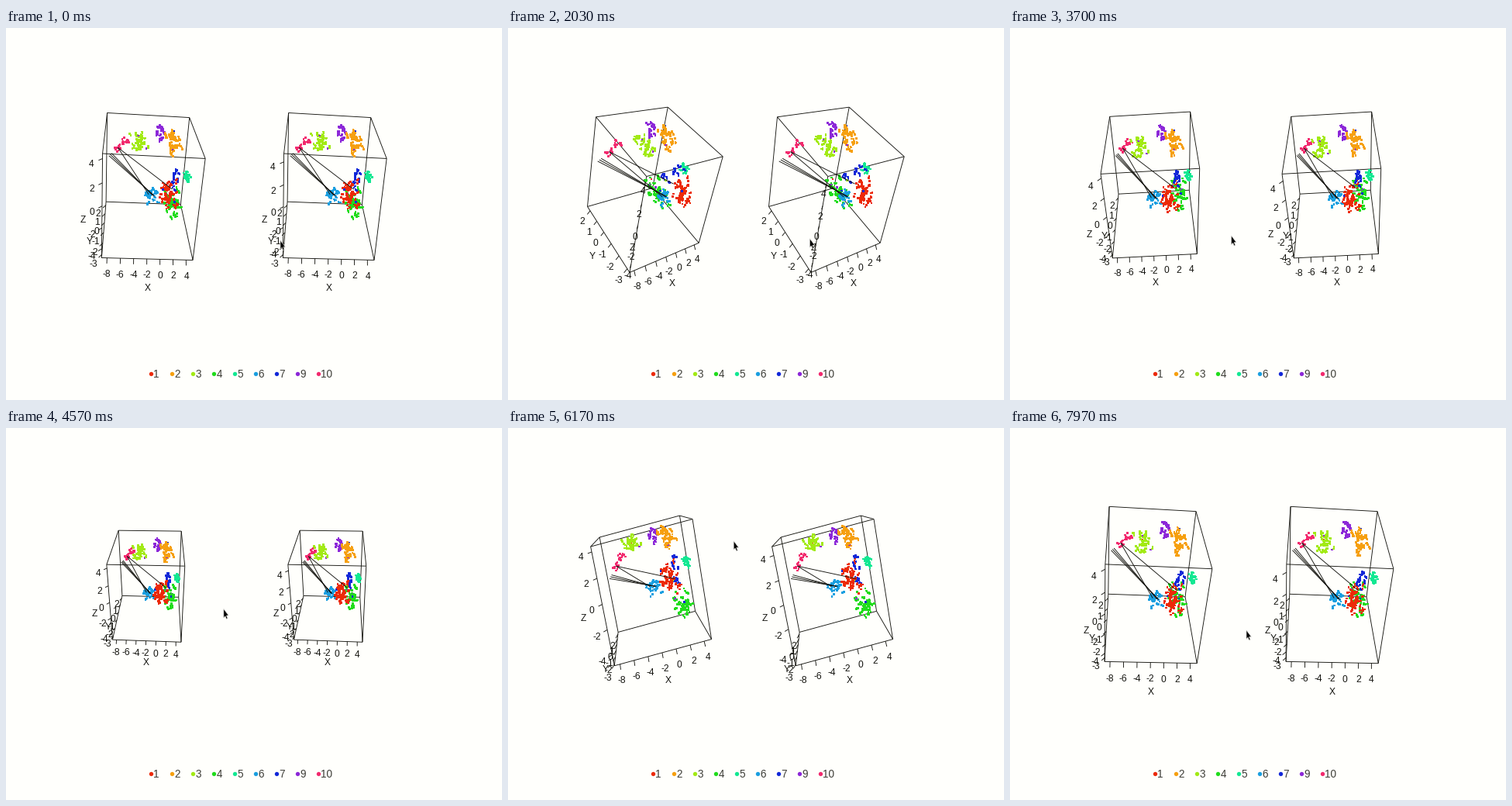
A matplotlib script for the animation above (8010 ms loop, 640x480 px).

```python
import itertools

import numpy as np
import matplotlib.pyplot as plt
from matplotlib.animation import FuncAnimation
from matplotlib.collections import LineCollection
from matplotlib.colors import to_rgba
from matplotlib.patches import Polygon

W, H, DPI = 640, 480, 100
STEP, FRAMES = 30, 267
PX = 72 / DPI

CENTERS = np.array([[183.5, 200.5], [417.5, 200.5]])
EDGE, SQUEEZE, EYE = 139.5, 0.815, 4.2
INK = "#14140f"
FONT = "Liberation Sans"

COLORS = {1: "#ec2a08", 2: "#f6a010", 3: "#a2ea14", 4: "#20dc1c", 5: "#12e892",
          6: "#1a9fe0", 7: "#1228d8", 9: "#8c28d8", 10: "#f22a6e"}

# time: pitch, spin, roll
POSES = {
    850: (27, 5.1, 4.3),
    1530: (24, 6.9, 7.3),
    2530: (42, 3.1, -8),
    4570: (29.5, -3.8, -.8),
    6170: (10.2, .6, -12.4),
    6730: (29.8, 71.5, 33),
    7970: (34.3, 6.2, 5.3),
}
# sideways drags out and back: start, end, degrees
SWINGS = [(850, 1530, 30), (1530, 2530, 36), (6730, 7400, 9)]

# group: centre, half axis, spread
CLUSTERS = {
    1: ((.195, -.34, .075), (0, .02, .07), .047),
    2: ((.265, .17, .38), (0, .08, .04), .045),
    3: ((-.14, .06, .395), (0, .13, 0), .040),
    4: ((.355, .20, -.33), (.01, .15, .02), .047),
    5: ((.42, -.07, .14), (.01, 0, .03), .019),
    6: ((.03, -.25, .01), (.05, 0, -.01), .025),
    7: ((.30, -.02, .07), (0, .14, -.16), .015),
    9: ((.135, .31, .40), (0, .02, .02), .020),
    10: ((-.36, .375, .19), (.11, -.045, .11), .010),
}


def monotone_tangents(t, v):
    slope = np.diff(v, axis=0) / np.diff(t)[:, None]
    a, b = slope[:-1], slope[1:]
    same = a * b > 0
    m = np.zeros_like(v)
    m[1:-1] = np.where(same, 2 * a * b / np.where(same, a + b, 1), 0)
    return m


TIMES = np.array(list(POSES), float)
VALUES = np.array(list(POSES.values()), float)
TANGENTS = monotone_tangents(TIMES, VALUES)


def smooth(t, a, b):
    u = np.clip((t - a) / (b - a), 0, 1)
    return u * u * (3 - 2 * u)


def bump(t, a, b):
    return np.sin(np.pi * np.clip((t - a) / (b - a), 0, 1)) ** 2


def pose_at(t):
    """Cubic Hermite blend of the keyed poses, plus swings and zoom."""
    i = int(np.clip(np.searchsorted(TIMES, t, "right") - 1, 0, len(TIMES) - 2))
    h = TIMES[i + 1] - TIMES[i]
    u = np.clip((t - TIMES[i]) / h, 0, 1)
    pitch, spin, roll = (
        (1 + 2 * u) * (1 - u) ** 2 * VALUES[i] + u * u * (3 - 2 * u) * VALUES[i + 1]
        + h * u * (1 - u) * ((1 - u) * TANGENTS[i] - u * TANGENTS[i + 1]))
    swing = sum(size * bump(t, a, b) for a, b, size in SWINGS)
    zoom = .985 + .035 * smooth(t, 2530, 6170) - .26 * bump(t, 3300, 5840)
    return pitch, spin + swing, roll + .35 * swing, zoom


def cursor_at(t, pitch, spin):
    """The drag drives the view; before it the pointer drifts to its start."""
    drag = np.array([290 + 2.4 * spin, 98 + 4.65 * pitch + .55 * spin])
    return drag + (1 - smooth(t, 0, 830)) * (np.array([354, 274]) - drag)


def rotation(pitch, spin, roll):
    p, s, r = np.radians([pitch, spin, roll])
    turn = np.array([[np.cos(s), -np.sin(s), 0], [np.sin(s), np.cos(s), 0], [0, 0, 1]])
    tilt = np.array([[1, 0, 0], [0, np.sin(p), np.cos(p)], [0, -np.cos(p), np.sin(p)]])
    lean = np.array([[np.cos(r), np.sin(r), 0], [-np.sin(r), np.cos(r), 0], [0, 0, 1]])
    return lean @ tilt @ turn


def project(points, rot, zoom):
    """Offsets from the panel centre in pixels, and depth."""
    v = points @ rot.T
    f = EDGE * zoom * EYE / (EYE - v[:, 2])
    return np.column_stack([SQUEEZE * f * v[:, 0], -f * v[:, 1]]), v[:, 2]


def project_segments(segs, rot, zoom):
    xy, _ = project(segs.reshape(-1, 3), rot, zoom)
    return xy.reshape(-1, 2, 2)


def make_points():
    """Short random strands around each core; a few points swap group."""
    rng = np.random.default_rng(5)
    groups, parts = [], []
    for group, (center, axis, spread) in CLUSTERS.items():
        strands = int(10 + 13000 * spread ** 2)
        along = rng.uniform(-1, 1, (strands, 1))
        start = center + along * axis + rng.normal(0, spread, (strands, 3))
        walk = np.cumsum(rng.normal(0, .011, (strands, 3, 3)), axis=1)
        parts.append((start[:, None] + walk).reshape(-1, 3))
        groups += [group] * strands * 3
    groups = np.array(groups)
    odd = rng.random(len(groups)) < .025
    groups[odd] = rng.choice([1, 3, 7, 9], odd.sum())
    points = np.clip(np.vstack(parts), -.49, .49)
    return points, np.array([to_rgba(COLORS[g]) for g in groups])


def make_links():
    """Lines from the pink chain to the light blue core, one to the red."""
    pink, axis = map(np.array, CLUSTERS[10][:2])
    blue, side = map(np.array, CLUSTERS[6][:2])
    links = [(pink - u * axis, blue + (1.3 * u - .8) * side) for u in (0, .7, .85, 1)]
    links.append((pink, np.array([.27, -.1, 0])))
    return np.array(links)


POINTS, POINT_COLORS = make_points()
LINKS = make_links()

CORNERS = np.array(list(itertools.product((-.5, .5), repeat=3)))
EDGES = np.array([(p, q) for p, q in itertools.combinations(CORNERS, 2)
                  if np.count_nonzero(p != q) == 1])

TICKS = [range(-8, 5, 2), range(-3, 3), range(-4, 5, 2)]
XY_LIMITS = [(-8.8, 5.05), (-3.28, 2.42)]
Z_LIMITS = [(-4.9, 4.4), (-5.1, 4.7)]


def make_axes(limits):
    """Tick segments, label anchors and label strings for the three axes."""
    segs, anchors, names = [], [], []
    for k, (lo, hi) in enumerate(limits):
        out = -np.ones(3)
        out[k] = 0
        for v in TICKS[k]:
            base = np.full(3, -.5)
            base[k] = (v - lo) / (hi - lo) - .5
            segs.append((base, base + .035 * out))
            anchors.append(base + .096 * out)
            names.append(str(v))
        anchors.append(.672 * out)
        names.append("XYZ"[k])
    return np.array(segs), np.array(anchors), names


AXES = [make_axes(XY_LIMITS + [z]) for z in Z_LIMITS]
ARROW = np.array([(0, 0), (0, 11.5), (2, 9.3), (3.6, 13), (5.1, 12.2), (3.6, 8.6), (6.3, 8.4)])

fig = plt.figure(figsize=(W / DPI, H / DPI), dpi=DPI, facecolor="#fffffc")
ax = fig.add_axes([0, 0, 1, 1])
ax.set(xlim=(0, W), ylim=(H, 0))
ax.axis("off")


def label(x, y, s, size, color=INK):
    return ax.text(x, y, s, size=size * PX, color=color, family=FONT,
                   ha="center", va="center_baseline", zorder=4)


frame_lines = LineCollection([], colors=INK, linewidths=.9 * PX, zorder=1)
link_lines = LineCollection([], colors=INK, linewidths=.9 * PX, zorder=3)
ax.add_collection(frame_lines)
ax.add_collection(link_lines)
dots = ax.scatter([], [], s=(2.6 * PX) ** 2, marker="s", linewidths=0, zorder=2)
labels = [[label(0, 0, s, 12) for s in names] for _, _, names in AXES]
cursor = ax.add_patch(Polygon(ARROW, closed=True, fc="black", ec="#dcdcd6",
                              lw=.6 * PX, zorder=6))

for i, (name, color) in enumerate(COLORS.items()):
    x = 186.5 + 27 * i
    ax.scatter([x], [445.5], s=(5.4 * PX) ** 2, color=color, linewidths=0)
    label(x + (7.5 if name < 10 else 11), 445.5, str(name), 13.5, "#3c3c36")


def draw(i):
    t = i * STEP
    pitch, spin, roll, zoom = pose_at(t)
    rot = rotation(pitch, spin, roll)

    xy, depth = project(POINTS, rot, zoom)
    order = np.argsort(depth)
    dots.set_offsets(np.vstack([xy[order] + c for c in CENTERS]))
    dots.set_facecolors(np.tile(POINT_COLORS[order], (2, 1)))

    links = project_segments(LINKS, rot, zoom)
    link_lines.set_segments(np.vstack([links + c for c in CENTERS]))

    box = project_segments(EDGES, rot, zoom)
    lines = []
    for c, (ticks, anchors, _), texts in zip(CENTERS, AXES, labels):
        lines += [box + c, project_segments(ticks, rot, zoom) + c]
        spots, _ = project(anchors, rot, zoom)
        for text, spot in zip(texts, spots + c):
            text.set_position(spot)
    frame_lines.set_segments(np.vstack(lines))

    cursor.set_xy(ARROW + cursor_at(t, pitch, spin))
    return []


anim = FuncAnimation(fig, draw, frames=FRAMES, interval=STEP, repeat=True,
                     repeat_delay=0, blit=False)
plt.show()
```
